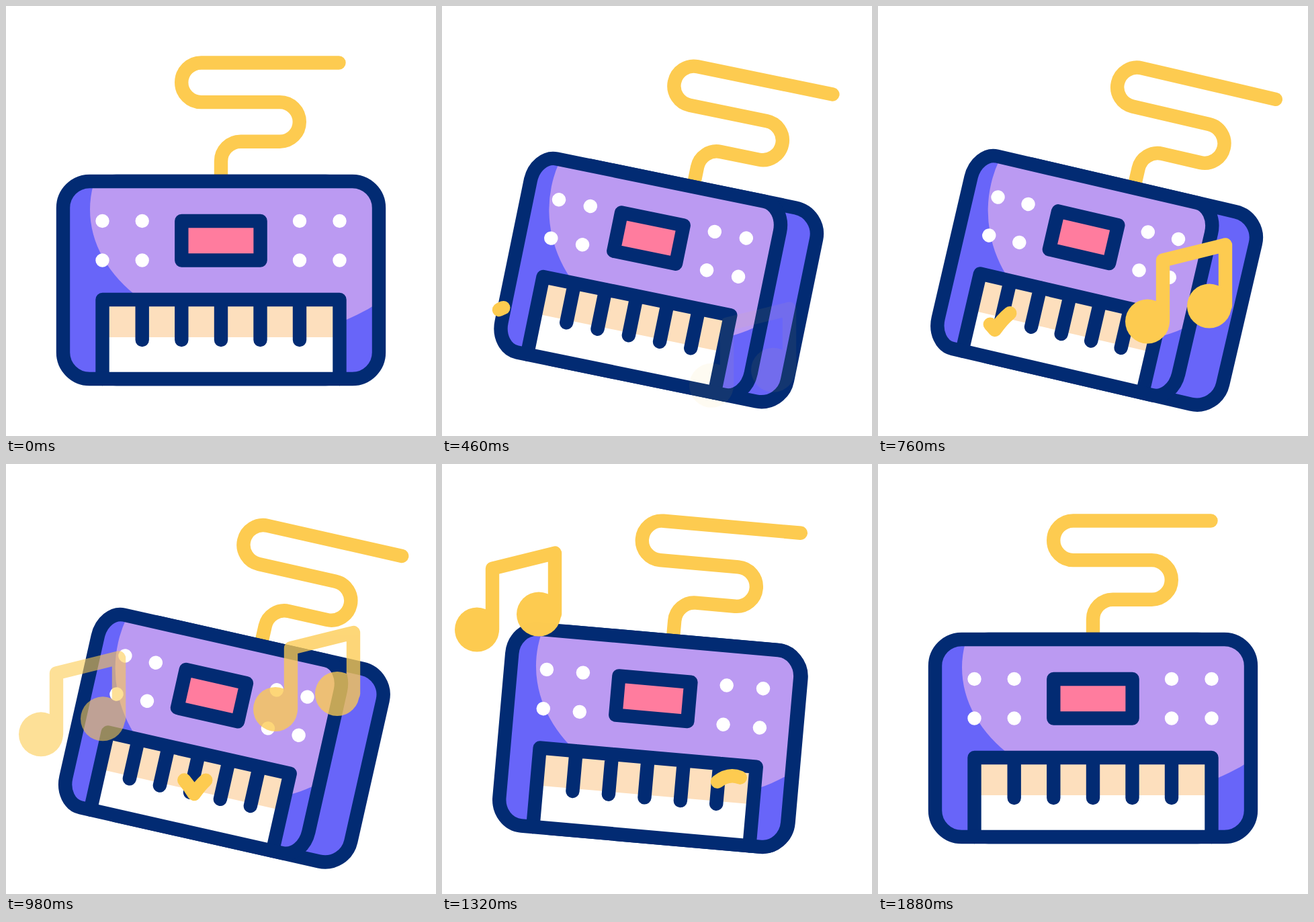
These frames come from a looping animation (640x640 px, 2.4 s). An HTML page:

```html
<!DOCTYPE html>
<html lang="en">
<head>
<meta charset="utf-8">
<title>Keyboard</title>
<style>
  html, body { margin: 0; height: 100%; overflow: hidden; background: #fff; }
  svg { display: block; width: 100vw; height: 100vh; }
  .line { fill: none; stroke: #022b73; stroke-width: 20.4; stroke-linecap: round; stroke-linejoin: round; }
  .gold { fill: none; stroke: #fdcb50; stroke-width: 20.4; stroke-linecap: round; stroke-linejoin: round; }
  #front * { vector-effect: non-scaling-stroke; }
</style>
</head>
<body>
<svg viewBox="0 0 640 640">
  <defs>
    <clipPath id="face"><rect x="85" y="261" width="470" height="294" rx="39.5"/></clipPath>
    <g id="note">
      <path class="gold" d="M23 0V-91L116-114V-23"/>
      <g fill="#fdcb50"><circle r="33"/><circle cx="92" cy="-23" r="33"/></g>
    </g>
  </defs>
  <g id="body">
    <path class="gold" d="M495.5 84.5H290.5a29.3 29.3 0 0 0 0 58.6H407.5a29.3 29.3 0 0 1 0 58.6H349.3a29.3 29.3 0 0 0-29.3 29.3V255"/>
    <rect class="line" style="fill:#6865f9" x="125" y="261" width="390" height="294" rx="39.5"/>
    <g id="front">
      <g clip-path="url(#face)">
        <rect x="85" y="261" width="470" height="294" fill="#6865f9"/>
        <ellipse cx="381" cy="303" rx="256" ry="188" fill="#bb9af2"/>
        <rect x="143" y="437" width="354" height="118" fill="#fff"/>
        <rect x="143" y="437" width="354" height="56" fill="#fddfbd"/>
      </g>
      <path class="line" d="M143.5 555V437H496.5V555M202.7 437v60M261.3 437v60M320 437v60M378.5 437v60M437 437v60"/>
      <rect class="line" x="85" y="261" width="470" height="294" rx="39.5"/>
      <rect class="line" style="fill:#ff7c9e" x="261.3" y="320" width="117.3" height="58.5"/>
      <path class="line" style="stroke:#fff" d="M143.5 320h.01M202.7 320h.01M437 320h.01M496.5 320h.01M143.5 378.5h.01M202.7 378.5h.01M437 378.5h.01M496.5 378.5h.01"/>
    </g>
  </g>
  <path id="trail" class="gold" pathLength="1" d="M85 452Q130 429 174 482Q227 406 280 491Q333 415 387 500Q434 425 481 507"/>
  <use id="right" href="#note"/>
  <use id="left" href="#note"/>
</svg>
<script>
const LOOP = 2400;
const $ = id => document.getElementById(id);
const body = $('body'), front = $('front'), trail = $('trail');

const clamp = v => Math.min(1, Math.max(0, v));
// symmetric ease in and out with the given power
const ease = (u, p) => u < .5 ? (2 * u) ** p / 2 : 1 - (2 - 2 * u) ** p / 2;
const span = (t, from, to, p) => ease(clamp((t - from) / (to - from)), p);

function moveNote(el, t, start, x, y) {
  const life = 720, fade = 240, age = t - start;
  const rise = 236 * (1 - Math.cos(Math.PI * clamp(age / life))) / 2;
  el.setAttribute('transform', `translate(${x} ${y - rise})`);
  el.setAttribute('opacity', clamp(Math.min(age, life - age) / fade));
}

function draw(t) {
  const turn = span(t, 0, 705, 4) - span(t, 690, 1876, 4);
  body.setAttribute('transform', `rotate(${13.1 * turn} 307 531)`);
  front.setAttribute('transform', `translate(${13.9 * turn} 0) scale(${1 - .219 * turn} 1)`);

  const head = span(t, 424, 1495, 1.35), tail = span(t, 512, 1570, 1.35);
  trail.style.display = head > tail ? '' : 'none';
  trail.style.strokeDasharray = `${head - tail} 2`;
  trail.style.strokeDashoffset = -tail;

  moveNote($('right'), t, 445, 401, 565);
  moveNote($('left'), t, 840, 52, 424);
}

const begin = performance.now();
function tick() {
  draw((performance.now() - begin) % LOOP);
  requestAnimationFrame(tick);
}
tick();
</script>
</body>
</html>
```
